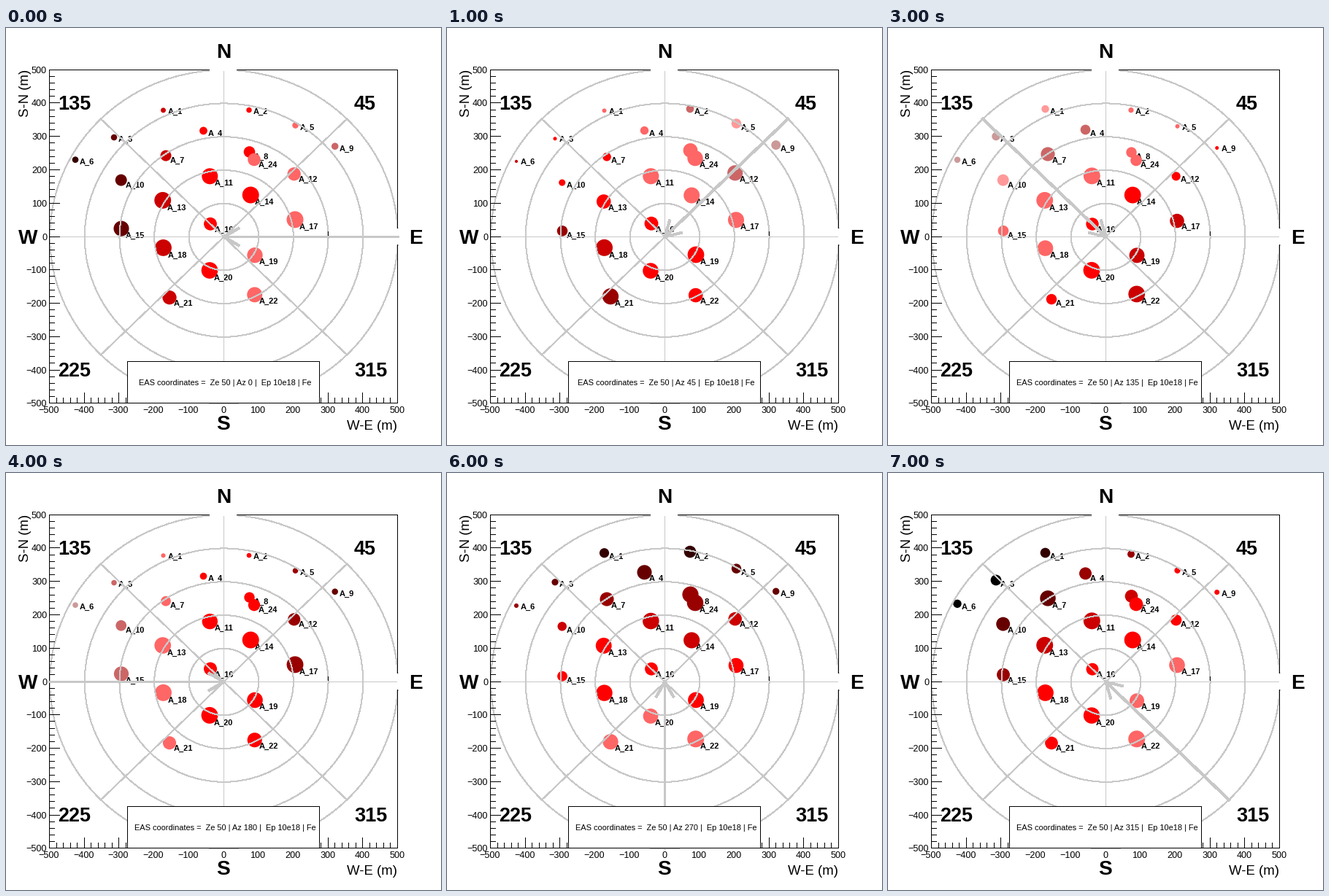
A matplotlib script that plays this animation: 596x572 px, repeating every 8000 ms.

```python
import numpy as np
import matplotlib.pyplot as plt
from matplotlib.animation import FuncAnimation
from matplotlib.patches import Circle, Ellipse, Rectangle

W, H, DPI = 596, 572, 100
PX = 72 / DPI                           # points per pixel
CX, CY, UX, UY = 298, 286, 47.68, 45.76  # centre and pixels per 100 m
LEFT, RIGHT, TOP, BOTTOM = 59, 536, 57, 514
GREY = "#c8c8c8"
ZENITH = np.radians(50)

# station id: marker x, marker foot y
STATIONS = {
    1: (215.5, 116.3), 2: (333, 116.3), 3: (148, 154.3), 4: (270.5, 146.3),
    5: (396.5, 137.8), 6: (95, 185), 7: (219, 182.6), 8: (333.5, 177.8),
    9: (450.7, 167), 10: (157.7, 216.6), 11: (279.3, 214.3),
    12: (394.7, 209.4), 13: (214.7, 247.8), 14: (335.2, 240.5),
    15: (158, 285.6), 16: (280, 277.6), 17: (396, 274.3),
    18: (215.5, 312.8), 19: (341, 322.3), 20: (279, 343.8),
    21: (224, 379.3), 22: (340.7, 376.3), 24: (340, 189.3),
}

# arrival order in metres along the shower: late is black, early is pale
EDGES = [-428, -350, -274, -195, -108, 84, 238, 325.8, 400]
COLORS = [(n / 5, 0, 0) for n in range(6)]
COLORS += ["#ff6666", "#cc6666", "#ff9999", "#cc9999"]

plt.rcParams["font.family"] = "Liberation Sans"
plt.rcParams["path.snap"] = False
fig = plt.figure(figsize=(W / DPI, H / DPI), dpi=DPI, facecolor="white")
ax = fig.add_axes([0, 0, 1, 1])
ax.set_xlim(0, W)
ax.set_ylim(H, 0)
ax.axis("off")


def line(xs, ys, color="black", width=1, z=5):
    """Hard-edged line through pixel centres."""
    return ax.plot(np.add(xs, 0.5), np.add(ys, 0.5), color=color,
                   lw=width * PX, zorder=z, antialiased=False,
                   solid_capstyle="projecting", solid_joinstyle="miter")[0]


def label(x, y, s, px, ha="center", va="baseline", z=8, **kw):
    return ax.text(x, y, s, fontsize=px * PX, ha=ha, va=va, zorder=z, **kw)


def middle(x, y, s, px, ha="center", **kw):
    """Text whose capitals are centred on y."""
    return label(x, y + 0.344 * px, s, px, ha, **kw)


def draw_grid():
    for n in range(1, 6):
        ax.add_patch(Ellipse((CX + 0.5, CY + 0.5), 2 * n * UX, 2 * n * UY,
                             fill=False, ec=GREY, lw=PX, zorder=4,
                             antialiased=False))
    line([LEFT, RIGHT], [CY, CY], GREY, z=4)
    line([CX, CX], [TOP, BOTTOM], GREY, z=4)
    dx, dy = 5 * UX * np.sqrt(0.5), 5 * UY * np.sqrt(0.5)
    for s in (-1, 1):
        line([CX - dx, CX + dx], [CY - s * dy, CY + s * dy], GREY, z=4)


def draw_axes():
    line([LEFT, RIGHT, RIGHT, LEFT, LEFT],
         [TOP, TOP, BOTTOM, BOTTOM, TOP])
    ax.add_patch(Rectangle((279, TOP - 1), 37, 3, fc="white", zorder=6))
    ax.add_patch(Rectangle((RIGHT, 275), 3, 22, fc="white", zorder=6))
    for v in range(-500, 501, 20):
        size = 14 if v % 100 == 0 else 7
        x, y = int(CX + v / 100 * UX), int(CY - v / 100 * UY)
        line([x, x], [BOTTOM, BOTTOM - size])
        line([LEFT, LEFT + size], [y, y])
        if v % 100 == 0:
            s = str(v).replace("-", "\u2212")
            middle(x, 523.5, s, 12.6)
            middle(56, y + 0.5, s, 12.6, "right")
    line([441, 441], [279, 284], z=8)
    middle(536, 544.5, "W-E (m)", 18.6, "right")
    label(31, 57, "S-N (m)", 18.6, "right", rotation=90,
          rotation_mode="anchor")


def draw_compass():
    for x, y, s in [(298, 31.5, "N"), (298, 541, "S"),
                    (30, 286, "W"), (561.5, 286, "E")]:
        middle(x, y, s, 28, weight="bold")
    for x, y, s in [(71, 103, "135"), (477, 103, "45"),
                    (71, 469, "225"), (477, 469, "315")]:
        middle(x, y, s, 27, "left", weight="bold")


draw_grid()
draw_axes()
draw_compass()

dots = {}
for k, (x, foot) in STATIONS.items():
    label(x + 6, foot + 1.8, f"A_{k}", 11, "left", z=2, weight="bold")
    dots[k] = ax.add_patch(Circle((x, foot), 1, lw=0, zorder=3))

shaft = line([], [], GREY, 3, z=6)
head = line([], [], GREY, 3, z=6)

ax.add_patch(Rectangle((166.5, 457.5), 263, 57, fc="white", ec="black",
                       lw=PX, zorder=7, antialiased=False))
info = middle(300.5, 486.5, "", 11.05)


def marker(k, a):
    """Radius and colour of a station for a shower from angle a."""
    x, foot = STATIONS[k]
    gx, gy = (x - CX) / UX * 100, (CY + 7 - foot) / UY * 100
    along = gx * np.cos(a) + gy * np.sin(a)
    dist = np.sqrt(gx**2 + gy**2 - (along * np.sin(ZENITH))**2)
    dist *= 1.06 + 0.09 * np.cos(a - np.radians(110))
    r = 11.5 / (1 + ((dist - 140) / 180)**2)
    return r, COLORS[np.searchsorted(EDGES, along)]


def update(i):
    az = 45 * i
    a = np.radians(az)
    for k, dot in dots.items():
        r, color = marker(k, a)
        x, foot = STATIONS[k]
        dot.set_center((x, foot - r))
        dot.set_radius(r)
        dot.set_facecolor(color)
    tx, ty = 5 * UX * np.cos(a), -5 * UY * np.sin(a)
    shaft.set_data([CX + 0.5, CX + 0.5 + tx], [CY + 0.5, CY + 0.5 + ty])
    t = np.arctan2(ty, tx) + np.radians([-30, 30])
    ex, ey = CX + 0.5 + 23 * np.cos(t), CY + 0.5 + 23 * np.sin(t)
    head.set_data([ex[0], CX + 0.5, ex[1]], [ey[0], CY + 0.5, ey[1]])
    info.set_text(f"EAS coordinates =  Ze 50 | Az {az} |  Ep 10e18 | Fe")
    return [*dots.values(), shaft, head, info]


anim = FuncAnimation(fig, update, frames=8, interval=1000, repeat=True,
                     repeat_delay=0, blit=False)
plt.show()
```
